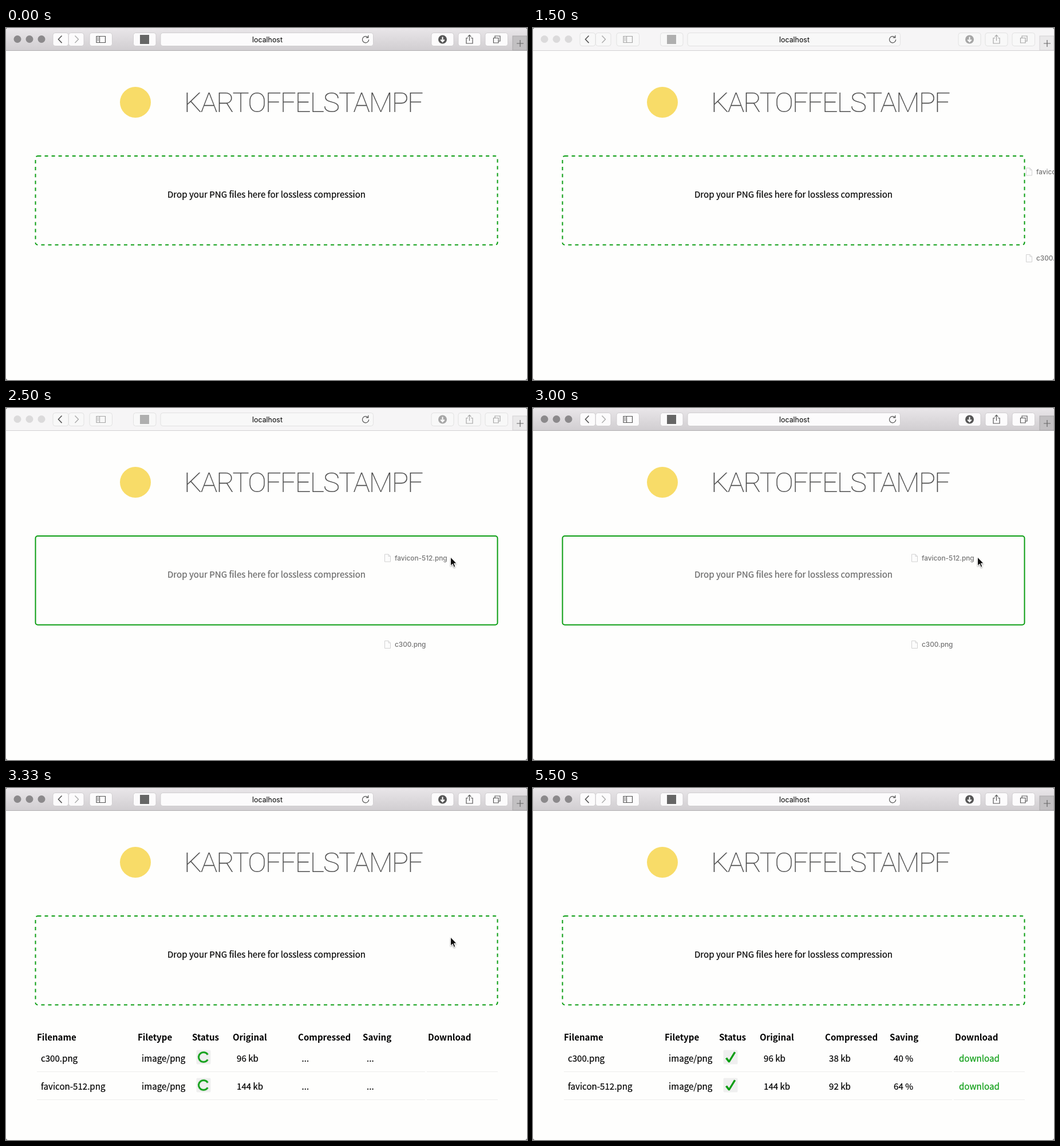
An HTML page that plays this animation: 910 by 616 pixels, repeating every 8 s.

```html
<!DOCTYPE html>
<html lang="en">
<head>
<meta charset="utf-8">
<title>Kartoffelstampf</title>
<style>
html, body { margin: 0; width: 100%; height: 100%; overflow: hidden; background: #fefefd; }
svg { display: block; width: 100vw; height: 100vh; }
text {
  font: 15.1px "Noto Sans CJK JP", "Noto Sans CJK SC", "Noto Sans CJK", "Noto Sans", sans-serif;
  white-space: pre; color: #000; fill: currentColor; stroke: currentColor; stroke-width: .22;
}
.address { font: 12.4px Inter, sans-serif; text-anchor: middle; stroke: none; }
.title { font: 100 49px Roboto, sans-serif; letter-spacing: -2px; color: #484848; }
.head text { font-weight: 700; stroke: none; }
.file text { font: 500 11.8px Inter, sans-serif; color: #747474; stroke: none; }
.link { color: #0a9d12; }
.line { fill: none; stroke: #555; stroke-width: 1.2; }
.rule { stroke: #ececec; }
.zone { fill: none; stroke: #0a9d12; stroke-width: 2; }
.tile { fill: #efefef; }
.ring { fill: none; stroke: #0a9d12; stroke-width: 3; stroke-dasharray: 300 60; }
.tick { fill: #0a9d12; }

/* Every part shares one 8 s timeline with hard changes. */
.anim { animation: 8s step-end infinite; }
.focus { animation-name: focus; }
.button { fill: #fcfbfc; stroke: #c9c7c9; stroke-width: .8; animation-name: button; }
.dim { animation-name: dim; --dim: .5; }
.lights { fill: #8b898b; --dim: .25; }
.files { animation-name: files; }
.idle { animation-name: idle; stroke-dasharray: 6 6.04; }
.hover { animation-name: hover; }
.prompt { text-anchor: middle; animation-name: prompt; }
.table { animation-name: table; }
.wait1 { animation-name: wait1; }
.done1 { animation-name: done1; }
.wait2 { animation-name: wait2; }
.done2 { animation-name: done2; }
.cursor { animation-name: cursor; }
.arrow { animation-name: arrow; }
.hand { animation-name: hand; }
.spin { animation: spin 8s steps(48, end) -7ms infinite; }

@keyframes focus { 0%, 37.5% { visibility: visible } 2% { visibility: hidden } }
@keyframes button {
  0%, 37.5% { fill: #fcfbfc; stroke: #c9c7c9 }
  2% { fill: #f8f8f8; stroke: #dcdcdc }
}
@keyframes dim { 0%, 37.5% { opacity: 1 } 2% { opacity: var(--dim) } }
@keyframes files {
  0%, 39.5% { visibility: hidden; transform: none }
  18.75% { visibility: visible; transform: translate(200px, -11px) }
  20.75% { visibility: visible; transform: translate(138px, 2px) }
  22.875% { visibility: visible; transform: translate(88px, 8px) }
  25% { visibility: visible; transform: translate(50px, 10px) }
  27% { visibility: visible; transform: translate(22px, 7px) }
  29.125% { visibility: visible; transform: translate(6px, 3px) }
  31.25% { visibility: visible; transform: none }
}
@keyframes cursor {
  0%, 68.75%, 100% { transform: translate(300px, 0) }
  18.75% { transform: translate(200px, -11px) }
  20.75% { transform: translate(138px, 2px) }
  22.875% { transform: translate(88px, 8px) }
  25% { transform: translate(50px, 10px) }
  27% { transform: translate(22px, 7px) }
  29.125% { transform: translate(6px, 3px) }
  31.25% { transform: none }
  58.25% { transform: translate(2px, 0) }
  60.375% { transform: translate(14px, 2px) }
  62.5% { transform: translate(55px, 6px) }
  64.5% { transform: translate(107px, 8px) }
  66.625% { transform: translate(118px, 10px) }
}
@keyframes idle { 0%, 39.5% { visibility: visible } 25% { visibility: hidden } }
@keyframes hover { 0%, 39.5% { visibility: hidden } 25% { visibility: visible } }
@keyframes prompt { 0%, 39.5% { color: #000 } 25% { color: #696969 } }
@keyframes table { 0% { visibility: hidden } 39.5%, 100% { visibility: visible } }
@keyframes wait1 { 0%, 52% { visibility: hidden } 39.5% { visibility: visible } }
@keyframes done1 { 0% { visibility: hidden } 52%, 100% { visibility: visible } }
@keyframes wait2 { 0%, 66.625% { visibility: hidden } 39.5% { visibility: visible } }
@keyframes done2 { 0% { visibility: hidden } 66.625%, 100% { visibility: visible } }
@keyframes arrow { 0%, 64.5% { visibility: visible } 52% { visibility: hidden } }
@keyframes hand { 0%, 64.5% { visibility: hidden } 52% { visibility: visible } }
@keyframes spin { to { transform: rotate(3600deg) } }
</style>
</head>
<body>
<svg viewBox="0 0 910 616" preserveAspectRatio="none">
  <defs>
    <linearGradient id="chrome" x2="0" y2="1">
      <stop stop-color="#e9e6e9"/><stop offset="1" stop-color="#d1ced1"/>
    </linearGradient>
    <filter id="shadow" x="-50%" y="-50%" width="200%" height="200%">
      <feDropShadow dx="0" dy="1.2" stdDeviation="1" flood-opacity=".4"/>
    </filter>
    <clipPath id="window"><rect width="910" height="616" rx="4"/></clipPath>
    <g id="sheet">
      <path d="M.5 .5h6.5l3.5 3.5v9.5h-10z" fill="#fcfcfc" stroke="#d2d2d2"/>
      <path d="M7 .5v3.5h3.5" fill="none" stroke="#d2d2d2"/>
    </g>
    <rect id="tile" class="tile" x="-12.5" y="-12.5" width="25" height="25" rx="2"/>
    <path id="tick" class="tick" d="M-9 2.5l3-2 3.4 4.6L6.2-9.5 9.2-8-1.4 9.2h-2.4z"/>
    <g id="spinner" class="spin"><circle class="ring" r="8.5" pathLength="360" transform="rotate(-120)"/></g>
  </defs>

  <rect width="910" height="616" fill="#666"/>
  <g clip-path="url(#window)">
    <rect width="910" height="616" fill="#fefefd"/>

    <rect width="910" height="39" fill="#f6f5f6"/>
    <rect y="39" width="910" height="1" fill="#d3d1d3"/>
    <rect x="885" y="14" width="25" height="25" fill="#eae9ea" stroke="#d3d1d3"/>
    <g class="anim focus">
      <rect width="910" height="39" fill="url(#chrome)"/>
      <rect y="39" width="910" height="1" fill="#b1afb1"/>
      <rect x="885" y="14" width="25" height="25" fill="#c2c0c2" stroke="#aaa8aa"/>
    </g>
    <g class="anim dim lights">
      <circle cx="20" cy="19.5" r="6.5"/><circle cx="41" cy="19.5" r="6.5"/><circle cx="62" cy="19.5" r="6.5"/>
    </g>
    <g class="anim button">
      <rect x="82" y="8.5" width="27" height="23" rx="4"/>
      <rect x="109.5" y="8.5" width="26.5" height="23" rx="4"/>
      <rect x="146" y="8.5" width="39.5" height="23" rx="4"/>
      <rect x="222.5" y="8.5" width="39.5" height="23" rx="4"/>
      <rect x="270" y="8.5" width="371.5" height="23" rx="4"/>
      <rect x="743" y="8.5" width="39" height="23" rx="4"/>
      <rect x="790" y="8.5" width="39" height="23" rx="4"/>
      <rect x="837" y="8.5" width="39.5" height="23" rx="4"/>
    </g>
    <path class="line" d="M97.5 13.5l-6 6.3 6 6.3" style="stroke-width:1.6"/>
    <path class="line" d="M120.5 13.5l6 6.3-6 6.3" style="stroke:#aaa;stroke-width:1.4"/>
    <g class="anim dim line">
      <path d="M158 14.5h15.5v11h-15.5zM163.5 14.5v11M159.5 17h2.5M159.5 19.5h2.5M159.5 22h2.5"/>
      <rect x="234" y="12" width="16" height="16" fill="#666" stroke="none"/>
      <circle cx="762.5" cy="20" r="7.5" fill="#555" stroke="none"/>
      <path d="M762.5 15.5v7M759.2 20.5l3.3 3.5 3.3-3.5" stroke="#fff" stroke-width="2"/>
      <path d="M807 17.5h-3v9.5h11v-9.5h-3M809.5 22.5v-10M806.5 15.3l3-3 3 3"/>
      <path d="M851.5 17.5h8.5v8.5h-8.5zM854 17.5v-3.5h9v9h-3"/>
    </g>
    <path class="line" d="M632 16.2a5.6 5.6 0 1 0 1.7 4M632.8 12.8v4h-4"/>
    <path class="line" d="M892 27h12M898 21v12" style="stroke:#666"/>
    <text class="address" x="456.5" y="25">localhost</text>

    <circle cx="226" cy="130" r="27" fill="#f8dc68"/>
    <text class="title" x="311" y="147">KARTOFFELSTAMPF</text>

    <rect class="zone anim idle" x="51.5" y="224" width="807" height="155.5" rx="4"/>
    <rect class="zone anim hover" x="51.5" y="224" width="807" height="155.5" rx="4"/>
    <text class="prompt anim" x="455" y="296.5">Drop your PNG files here for lossless compression</text>

    <g class="anim table">
      <g class="head">
        <text x="54" y="442">Filename</text>
        <text x="230" y="442">Filetype</text>
        <text x="325" y="442">Status</text>
        <text x="396" y="442">Original</text>
        <text x="510" y="442">Compressed</text>
        <text x="623" y="442">Saving</text>
        <text x="737" y="442">Download</text>
      </g>
      <path class="rule" d="M54 496.5h678M735 496.5h124M54 545.5h678M735 545.5h124"/>
      <text x="61" y="479">c300.png</text>
      <text x="237" y="479">image/png</text>
      <text x="403" y="479">96 kb</text>
      <use href="#tile" x="345" y="471"/>
      <text x="61" y="528">favicon-512.png</text>
      <text x="237" y="528">image/png</text>
      <text x="403" y="528">144 kb</text>
      <use href="#tile" x="345" y="520"/>
    </g>
    <g class="anim wait1">
      <use href="#spinner" x="345" y="471"/>
      <text x="516.5" y="479">...</text>
      <text x="630" y="479">...</text>
    </g>
    <g class="anim done1">
      <use href="#tick" x="345" y="471"/>
      <text x="517" y="479">38 kb</text>
      <text x="630" y="479">40 %</text>
      <text class="link" x="744" y="479">download</text>
    </g>
    <g class="anim wait2">
      <use href="#spinner" x="345" y="520"/>
      <text x="516.5" y="528">...</text>
      <text x="630" y="528">...</text>
    </g>
    <g class="anim done2">
      <use href="#tick" x="345" y="520"/>
      <text x="517" y="528">92 kb</text>
      <text x="630" y="528">64 %</text>
      <text class="link" x="744" y="528">download</text>
    </g>

    <g class="file anim files">
      <use href="#sheet" x="661" y="255.5"/>
      <text x="679" y="267">favicon-512.png</text>
      <use href="#sheet" x="661" y="407"/>
      <text x="679" y="418">c300.png</text>
    </g>
    <g class="anim cursor">
      <path class="anim arrow" filter="url(#shadow)" fill="#111" stroke="#fff"
        d="M776.5 261v15.2l3.5-3.3 2.4 5.6 2.5-1-2.4-5.5h4.7z"/>
      <path class="anim hand" filter="url(#shadow)" fill="#fff" stroke="#222" stroke-width="1.1" stroke-linejoin="round"
        d="M775.5 280v-2.5c-1-2-3-4-4.3-6-.8-1.6 1-2.4 2.3-1.2l1.7 1.7-2-6.6c-.6-2 1.7-2.6 2.5-.8l1.5 4.2c.2-1.7 2.5-1.6 2.9.2.7-1.4 2.5-1 2.8.4 1-.9 2.5-.3 2.7 1.2.5 3-.3 5.4-1.6 7.4v2zM779 273v4M781.3 273v4M783.5 273v4"/>
    </g>
  </g>
</svg>
</body>
</html>
```
